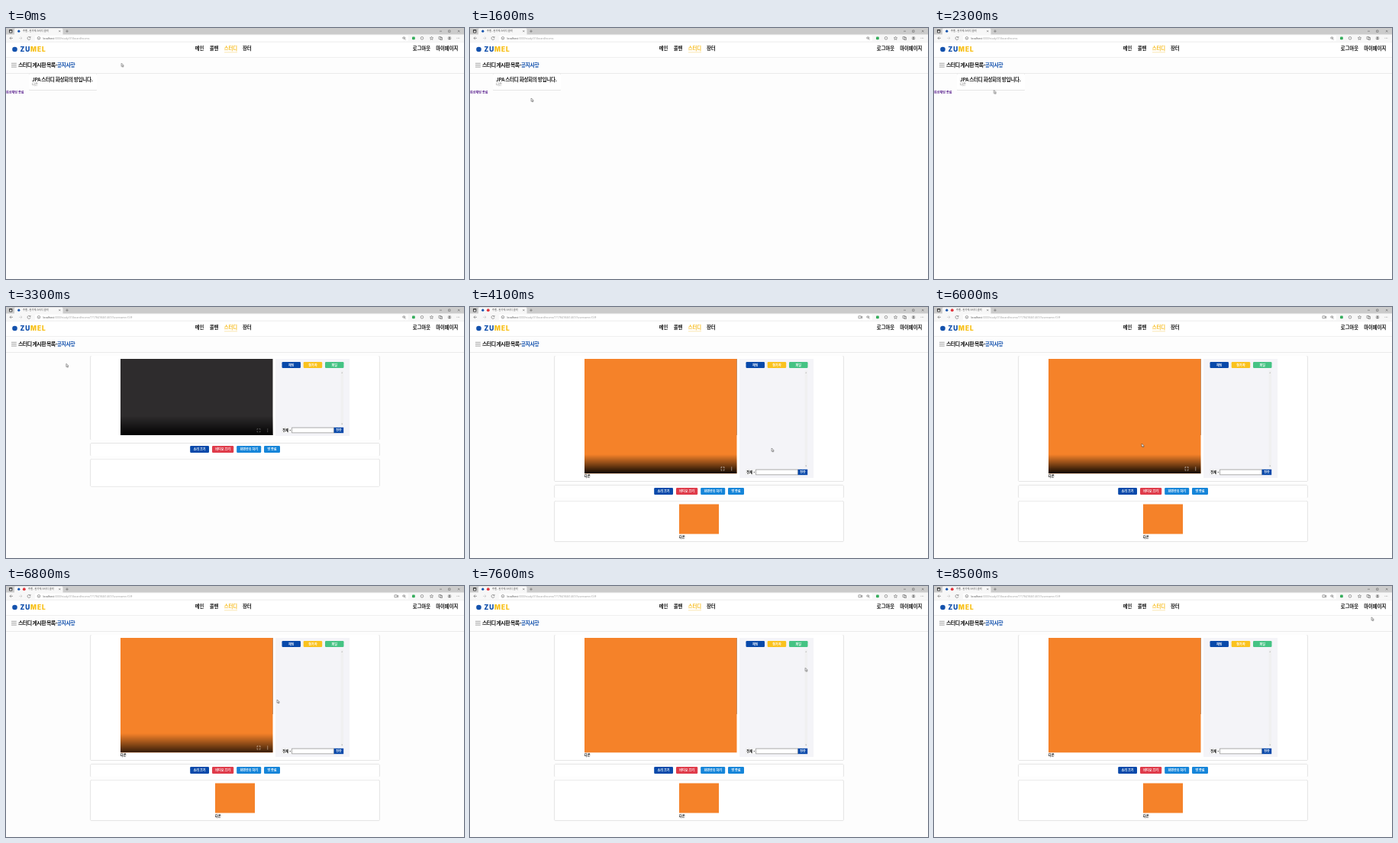
These frames come from a looping animation (600x329 px, 8.6 s). An HTML page:

```html
<!DOCTYPE html>
<html>
<head>
<meta charset="utf-8">
<title>Study room</title>
<style>
html, body { margin: 0; width: 100%; height: 100%; overflow: hidden; background: #fff; }
svg { display: block; width: 100vw; height: 100vh; }
text { font-family: "Noto Sans CJK KR", "Noto Sans CJK", "Noto Sans CJK JP", sans-serif; white-space: pre; }
.ui { font-family: "Open Sans", "Noto Sans CJK KR", sans-serif; }
.nav { font-size: 6.35px; font-weight: 900; fill: #161616; }
.btn { font-size: 4.1px; font-weight: 900; fill: #fff; text-anchor: middle; }
.name { font-size: 4.3px; font-weight: 900; fill: #111; }
.line { fill: none; stroke: #666; stroke-width: .6; }
.box { fill: #fff; filter: drop-shadow(0 .5px .7px rgba(0,0,0,.4)); }

.list, .room, .live, .cam, .drop, .grow, .shift { animation: 8.6s step-end infinite; }
.list { animation-name: leave; }
.room { animation-name: enter; }
.cam { animation-name: cam; }
.live { animation-name: live; }
.drop { animation-name: drop; }
.shift { animation-name: shift; }
.grow { animation-name: grow; }
.controls { animation: fade 8.6s linear infinite; }
.icons { animation: bright 8.6s step-end infinite; }
.cursor { animation: move 8.6s linear infinite; }

@keyframes leave { 0% { visibility: visible } 34.884%, 100% { visibility: hidden } }
@keyframes enter { 0% { visibility: hidden } 34.884%, 100% { visibility: visible } }
@keyframes cam { 0% { visibility: hidden } 43.023%, 100% { visibility: visible } }
@keyframes live { 0% { visibility: hidden } 46.512%, 100% { visibility: visible } }
@keyframes drop { 0% { transform: translateY(0) } 46.512%, 100% { transform: translateY(var(--d)) } }
@keyframes shift { 0% { transform: translateX(0) } 46.512%, 100% { transform: translateX(7px) } }
@keyframes grow { 0% { height: var(--a) } 46.512%, 100% { height: var(--b) } }
@keyframes bright { 0% { opacity: .4 } 46.512%, 100% { opacity: .9 } }
@keyframes fade {
  0%, 53.26% { opacity: 1 }
  56.05%, 59.9% { opacity: 0 }
  62.2%, 78.49% { opacity: 1 }
  81.98%, 100% { opacity: 0 }
}
@keyframes move {
  0%, 4.65% { transform: translate(151.2px, 46.2px) }
  10.47%, 12.79% { transform: translate(122px, 66px) }
  18.6%, 22.09% { transform: translate(80.2px, 92px) }
  30.23%, 38.37% { transform: translate(77.2px, 73.6px) }
  40.7%, 41.86% { transform: translate(352px, 178px) }
  44.19%, 46.51% { transform: translate(395px, 184px) }
  54.65%, 56.98% { transform: translate(396.2px, 191px) }
  61.63% { transform: translate(300px, 186px) }
  69.77%, 73.26% { transform: translate(272.2px, 179px) }
  79.07%, 82.56% { transform: translate(355.2px, 149px) }
  97.67%, 100% { transform: translate(573.2px, 40.8px) }
}
</style>
</head>
<body>
<svg viewBox="0 0 600 329" preserveAspectRatio="none">
  <defs>
    <linearGradient id="shade" x1="0" y1="0" x2="0" y2="1">
      <stop offset="0" stop-color="#000" stop-opacity="0"/>
      <stop offset=".45" stop-color="#000" stop-opacity=".42"/>
      <stop offset="1" stop-color="#000" stop-opacity=".95"/>
    </linearGradient>
    <clipPath id="tab"><rect x="11" width="54" height="9"/></clipPath>
  </defs>

  <rect width="600" height="329" fill="#fdfdfd"/>

  <!-- browser window -->
  <rect width="600" height="9" fill="#cbcbcb"/>
  <path d="M11 9V2q0-1.500 1.500-1.500H73q1.500 0 1.500 1.500V9z" fill="#f7f7f7"/>
  <rect y="8.500" width="600" height="10" fill="#f7f7f7"/>
  <rect x="38" y="9.800" width="489" height="7.400" rx="1.500" fill="#fff"/>
  <rect y="18.200" width="600" height=".5" fill="#dedede"/>
  <rect x="4" y="2" width="4.400" height="4.400" rx=".8" fill="#333"/>
  <rect x="4.900" y="3.500" width="2.600" height="2.200" fill="#ddd"/>
  <circle cx="16.800" cy="4.200" r="1.600" fill="#1452ad"/>
  <g clip-path="url(#tab)">
    <text class="ui shift" x="22" y="5.400" font-size="3.200" fill="#444">주멜 - 한기에 스터디 클릭</text>
  </g>
  <circle class="live" cx="23.800" cy="4.200" r="1.900" fill="#e0343c"/>
  <path class="line" d="M69.300 3.200l2 2m0-2l-2 2M78.200 4.200h3.600m-1.800-1.800v3.600M568 4.200h3M579.600 3h2.400v2.400h-2.400zM592 3l2.400 2.400m0-2.400l-2.400 2.400"/>
  <path class="line" d="M9 13.300H5m1.800-1.800L5 13.300l1.800 1.800"/>
  <path class="line" stroke-opacity=".35" d="M17 13.300h4m-1.800-1.800l1.800 1.800-1.800 1.800"/>
  <path class="line" d="M31.700 12.300a2 2 0 1 0 .3 1.500M32 11v1.500h-1.500"/>
  <circle class="line" cx="43" cy="13.300" r="1.800"/>
  <path class="line" d="M43 13v1.300"/>
  <text class="ui list" x="48.500" y="14.600" font-size="3.450" fill="#999"><tspan fill="#444">localhost</tspan>:3000/study/31/board/rooms</text>
  <text class="ui room" x="48.500" y="14.600" font-size="3.450" fill="#999"><tspan fill="#444">localhost</tspan>:3000/study/31/board/rooms/1?1784184614613?username=다온</text>
  <path class="line cam" d="M509 11.800h3.200v3H509zM512.200 13l1.600-.8v2.400l-1.600-.8"/>
  <path class="line" d="M520 12h2.600v2H520zM522 14l1.500 1.500"/>
  <rect x="532" y="11.400" width="3.800" height="3.800" rx="1" fill="#35ad5c"/>
  <circle class="line" cx="545" cy="13.300" r="1.800"/>
  <path class="line" d="M557.500 11.200l.7 1.400 1.500.2-1.100 1 .3 1.500-1.400-.7-1.400.7.300-1.500-1.100-1 1.500-.2zM567 11.500h3v3h-3zM568.500 12.500h3v3h-3"/>
  <circle cx="581" cy="13.300" r="2.500" fill="#c9c9c9"/>
  <circle cx="581" cy="12.600" r=".9" fill="#666"/>
  <path d="M579.300 15.100q1.700-2.200 3.400 0z" fill="#666"/>
  <path class="line" stroke-dasharray=".7 .8" d="M590.500 13.300h4"/>

  <!-- site header -->
  <rect y="18.700" width="600" height="19.600" fill="#fff"/>
  <rect y="38" width="600" height=".6" fill="#e4e4e4"/>
  <rect y="59" width="600" height=".6" fill="#dedede"/>
  <circle cx="11.500" cy="28" r="3.300" fill="#1452ad"/>
  <text x="18.500" y="31.100" style="font:900 8.300px Inter,sans-serif;letter-spacing:.9px" fill="#1452ad">ZU<tspan fill="#f8c11c">MEL</tspan></text>
  <g class="nav">
    <text x="247.700" y="29.400">메인</text>
    <text x="266.700" y="29.400">콜밴</text>
    <text x="285.700" y="29.400" fill="#f6bd22">스터디</text>
    <text x="310" y="29.400">장터</text>
    <text x="532.800" y="29.400">로그아웃</text>
    <text x="563.200" y="29.400">마이페이지</text>
  </g>
  <rect x="286" y="31.600" width="17" height=".6" fill="#f6d57e"/>
  <path class="line" d="M7 46.300h6.800M7 48.700h6.800M7 51.100h6.800"/>
  <text x="16" y="51.200" font-size="7" font-weight="900" letter-spacing="-.6" fill="#161616">스터디 게시판 목록-<tspan fill="#1452ad">공지사항</tspan></text>

  <!-- room list -->
  <g class="list">
    <rect class="box" x="30" y="60" width="89" height="21.500" rx="1"/>
    <text x="34" y="69.700" font-size="6.600" font-weight="700" letter-spacing="-.32" fill="#1c1c1c">JPA 스터디 화상회의 방입니다.</text>
    <text x="34" y="74.600" font-size="4.300" fill="#777">다온</text>
    <text x="0" y="85.700" font-size="4.100" font-weight="900" fill="#551a8b">화상채팅 종료</text>
  </g>

  <!-- meeting room -->
  <g class="room">
    <rect class="box grow" style="--a:110px;--b:164.500px" x="110.500" y="64" width="379" height="110" rx="1.500"/>
    <rect x="150" y="68" width="199.500" height="100" fill="#2e2c2d"/>
    <rect class="live" x="150" y="68" width="199.500" height="150.300" fill="#f58229"/>
    <g class="drop" style="--d:50.300px">
      <g class="controls">
        <rect x="150" y="143" width="199.500" height="25" fill="url(#shade)"/>
        <g class="icons">
          <path d="M329 161v-1.300h1.300M331.700 159.700h1.300v1.300M333 162.500v1.300h-1.300M330.300 163.800H329v-1.300" fill="none" stroke="#fff" stroke-width=".7"/>
          <path d="M342.300 159.600h.9v.9h-.9zM342.300 161.300h.9v.9h-.9zM342.300 163h.9v.9h-.9z" fill="#fff"/>
        </g>
      </g>
    </g>
    <text class="name live" x="149.700" y="223.200">다온</text>

    <rect class="grow" style="--a:101px;--b:156px" x="353" y="68" width="97" height="101" fill="#f4f4f8"/>
    <rect x="361.500" y="72" width="24.500" height="8" rx="1.200" fill="#0849aa"/>
    <rect x="389.700" y="72" width="24.500" height="8" rx="1.200" fill="#fac21e"/>
    <rect x="418" y="72" width="24.500" height="8" rx="1.200" fill="#45c384"/>
    <g class="btn">
      <text x="373.700" y="77.500">채팅</text>
      <text x="402" y="77.500">참가자</text>
      <text x="430.200" y="77.500">파일</text>
    </g>
    <rect class="grow" style="--a:72px;--b:127px" x="438.500" y="83.500" width="3.500" height="72" fill="#f0f0f1"/>
    <path d="M439.200 86.600l1-1.200 1 1.200z" fill="#999"/>
    <g class="drop" style="--d:55px">
      <path d="M439.200 152.800l1 1.200 1-1.200z" fill="#999"/>
      <rect x="361.800" y="158" width="12.500" height="7" fill="#fff" stroke="#ddd" stroke-width=".3"/>
      <text class="name" x="362.300" y="163.200" font-size="4">전체</text>
      <path d="M371.300 161.100h2l-1 1.100z" fill="#333"/>
      <rect x="374.700" y="158.100" width="55" height="6.800" fill="#fff" stroke="#777" stroke-width=".6"/>
      <rect x="429.700" y="157.800" width="12.500" height="7.400" fill="#0849aa"/>
      <text class="btn" x="436" y="163.100">전송</text>

      <rect class="box" x="110.500" y="178.500" width="379" height="16.500" rx="1.500"/>
      <rect x="241.200" y="182" width="24.800" height="9" rx="1.200" fill="#0849aa"/>
      <rect x="270" y="182" width="28.200" height="9" rx="1.200" fill="#df3b4a"/>
      <rect x="302.200" y="182" width="32" height="9" rx="1.200" fill="#1585d9"/>
      <rect x="338" y="182" width="21" height="9" rx="1.200" fill="#1585d9"/>
      <g class="btn">
        <text x="253.600" y="188">소리 끄기</text>
        <text x="284.100" y="188">비디오 끄기</text>
        <text x="318.200" y="188">화면공유 하기</text>
        <text x="348.500" y="188">방 종료</text>
      </g>

      <rect class="box grow" style="--a:36px;--b:53.300px" x="110.500" y="199.200" width="379" height="36" rx="1.500"/>
      <g class="live">
        <rect x="274" y="203.500" width="52" height="39" fill="#f58229"/>
        <text class="name" x="273.800" y="247.600">다온</text>
      </g>
    </g>
  </g>

  <path class="cursor" d="M0 0v4.300l1-.9.700 1.600.8-.4-.7-1.500h1.300z" fill="#fff" stroke="#222" stroke-width=".45"/>
</svg>
</body>
</html>
```
